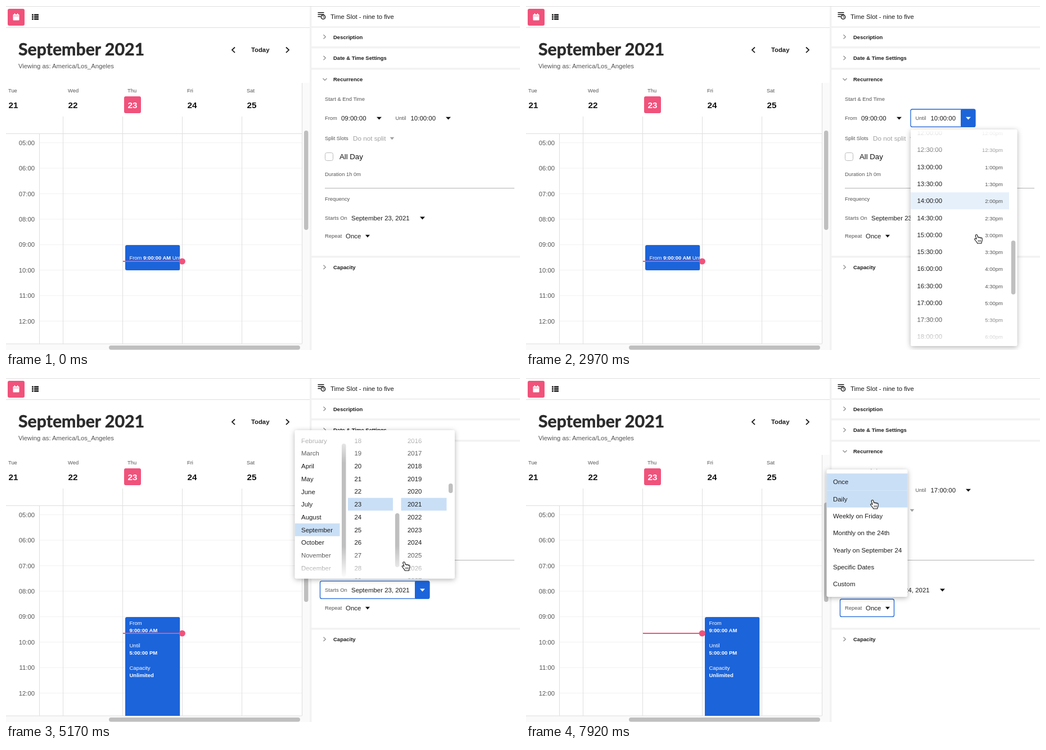
Recreate the animation shown at these times as an HTML page. Size 914 px wide and 613 px high, loop 8 s.

```html
<!DOCTYPE html>
<html lang="en">
<head>
<meta charset="utf-8">
<title>Time slot editor</title>
<style>
  html, body { margin: 0; width: 100%; height: 100%; overflow: hidden; background: #fff; }
  svg { display: block; }
  text { font-family: "Liberation Sans", Arial, sans-serif; white-space: pre; }
  .title { font-family: Lato, sans-serif; }
  .popup { filter: drop-shadow(0 2px 5px rgba(0, 0, 0, .3)); }
</style>
</head>
<body>
<svg width="914" height="613" viewBox="0 0 914 613">
  <defs>
    <linearGradient id="fadeTop" x2="0" y2="1">
      <stop stop-color="#fff"/><stop offset="1" stop-color="#fff" stop-opacity="0"/>
    </linearGradient>
    <linearGradient id="fadeBottom" x2="0" y2="1">
      <stop stop-color="#fff" stop-opacity="0"/><stop offset="1" stop-color="#fff"/>
    </linearGradient>
  </defs>
  <g id="base"></g>
  <g id="live"></g>
</svg>
<script>
const LOOP = 8000, STEP = 110;
const BLUE = '#1c64da', PINK = '#f0527b', INK = '#1c1c1c', GREY = '#555', PICKED = '#c9dff6', HOVER = '#e6f0fb';
const ROW = 30.27, DATE_ROW = 22.7, HOUR = 45.4, DAY = 106;

const range = n => [...Array(n).keys()];
const rect = (x, y, w, h, fill, r = 0, extra = '') =>
  `<rect x="${x}" y="${y}" width="${w}" height="${h}" rx="${r}" fill="${fill}" ${extra}/>`;
const path = (d, stroke, width = 1, fill = 'none') =>
  `<path d="${d}" stroke="${stroke}" stroke-width="${width}" fill="${fill}"/>`;
// y is the middle of the capital letters
const text = (x, y, str, size, fill = INK, extra = '') =>
  `<text x="${x}" y="${y + size * .36}" font-size="${size}" fill="${fill}" ${extra}>${str}</text>`;
const BOLD = 'font-weight="700"', END = 'text-anchor="end"', MIDDLE = 'text-anchor="middle"';
const label = (x, y, str) => text(x, y, str, 9.4, GREY);
const value = (x, y, str, fill) => text(x, y, str, 11.45, fill);
const caret = (x, y, fill = '#111', half = 4.5) => path(`M${x - half} ${y - 2.2}h${2 * half}l${-half} 4.8z`, 'none', 0, fill);
const thumb = (x, y, w, h) => rect(x, y, w, h, '#bfbfbf', 3.7);

function section(y, title, open) {
  const chevron = open ? `M563.5 ${y - 2}l3.5 3.5 3.5-3.5` : `M564.5 ${y - 4}l3.8 3.6-3.8 3.6`;
  return path(chevron, '#888', 1.2) + text(582, y, title, 9.5, INK, BOLD);
}

function drawBase() {
  let s = path('M0 .5H914M0 38.5H540M543 37.5H914', '#dedede');
  s += rect(3, 5, 30, 30, PINK, 3) + rect(12.5, 15, 11, 10.5, '#fff', 1)
    + path('M15.5 13v3M20.5 13v3', '#fff', 1.6) + path('M13.5 17.7h9', PINK, .8);
  s += range(3).map(i => rect(46, 14.5 + 3.7 * i, 2.8, 2.7, INK) + rect(50, 14.5 + 3.7 * i, 8, 2.7, INK)).join('');
  s += text(22, 77.5, 'September 2021', 30.3, '#2a2a2a', BOLD + ' class="title" stroke="#2a2a2a" stroke-width=".5"');
  s += text(22, 106.5, 'Viewing as: America/Los_Angeles', 11.3, GREY);
  s += path('M407 73.5l-5 4.8 5 4.8M498 73.5l5 4.8-5 4.8', INK, 1.8) + text(436, 78, 'Today', 11.3, INK, BOLD);

  // week grid
  s += rect(527, 137, 13, 465, '#fafafa') + rect(0, 602, 540, 11, '#fafafa');
  range(8).forEach(i => {
    const y = 243.7 + HOUR * i;
    s += path(`M59 ${y}H526`, '#f1f1f1') + text(51, y, `${i + 5}:00`.padStart(5, '0'), 11.3, GREY, END);
  });
  s += path('M101.5 197V602M207.5 197V602M313.5 197V602M419.5 197V602M59.5 228V602M526.5 137V602M0 227.5H526M0 602H526', '#dedede');
  ['Tue', 'Wed', 'Thu', 'Fri', 'Sat'].forEach((name, i) => {
    const today = i === 2, x = 4 + DAY * i;
    s += label(x, 151, name);
    if (today) s += rect(210, 161, 30, 30, PINK, 3);
    s += today ? text(225, 177, 23, 15.2, '#fff', BOLD + MIDDLE.padStart(20)) : text(x + .5, 177, 21 + i, 15.2, '#111', BOLD);
  });
  s += thumb(530, 222, 7.5, 177) + thumb(183, 605, 340, 7.5);

  // editor panel
  s += rect(540, 1, 3.5, 612, '#f2f2f2')
    + [72, 110, 445].map(y => rect(543, y, 371, 3.5, '#f2f2f2')).join('');
  s += path('M554.5 11.7h11M554.5 15.2h11M554.5 18.7h5', INK, 1.5)
    + `<circle cx="564" cy="19.7" r="3.6" fill="#fff" stroke="${INK}" stroke-width="1.5"/>` + path('M564 17.6v2.3h1.7', INK, 1);
  s += text(577, 18.7, 'Time Slot - nine to five', 11.4);
  s += section(55.3, 'Description') + section(93, 'Date &amp; Time Settings')
    + section(131, 'Recurrence', true) + section(465.8, 'Capacity');
  s += label(567, 166, 'Start &amp; End Time') + label(567, 200, 'From') + value(596, 199.5, '09:00:00') + caret(663.5, 200);
  s += label(567, 236, 'Split Slots') + text(617, 235.5, 'Do not split', 11.7, '#a0a0a0') + caret(686.5, 236, '#a0a0a0', 3.8);
  s += rect(567.5, 261.5, 14, 14, '#fff', 3, 'stroke="#bbb"') + text(593, 268, 'All Day', 13.2, '#111');
  s += path('M567 324.7H904', '#bdbdbd', 1.2) + label(567, 344, 'Frequency');
  return s;
}

function field(x, y, w, name, textX, content, caretX, active, button) {
  let s = '';
  if (active) {
    s += rect(x, y - 15.7, w, 31.4, '#fff', 3, `stroke="${BLUE}" stroke-width="1.3"`);
    if (button) s += rect(x + w - 26, y - 15.7, 26, 31.4, BLUE, 2);
  }
  return s + label(x + 8.6, y + .4, name) + value(textX, y, content)
    + caret(caretX, y + .3, active && button ? '#fff' : '#111', button ? 4.5 : 4);
}

function slotBlock(day, long) {
  const x = 212 + (day - 23) * DAY, tx = x + 7.5;
  const body = long
    ? [['From', '9:00:00 AM'], ['Until', '5:00:00 PM'], ['Capacity', 'Unlimited']].map(([name, val], i) =>
        text(tx, 436.8 + 39.8 * i, name, 9.5, '#fff') + text(tx, 450 + 39.8 * i, val, 9.5, '#fff', BOLD)).join('')
    : text(tx, 449, `From <tspan ${BOLD}>9:00:00 AM</tspan> Until`, 9.4, '#fff');
  const h = long ? 176 : 45;
  return `<svg x="${x}" y="426" width="97.5" height="${h}" viewBox="${x} 426 97.5 ${h}">`
    + rect(x, 426, 97.5, long ? 190 : 45, BLUE, 3) + body + '</svg>';
}

function popup(x, y, w, h, fade, content) {
  return rect(x, y, w, h, '#fff', 3, 'class="popup"')
    + `<svg x="${x}" y="${y}" width="${w}" height="${h}" viewBox="${x} ${y} ${w} ${h}">` + content
    + (fade ? rect(x, y, w, fade, 'url(#fadeTop)', 3) + rect(x, y + h - fade, w, fade, 'url(#fadeBottom)', 3) : '')
    + '</svg>';
}

function timeList(scroll, hovered) {
  const rows = range(48).map(i => {
    const y = 267 + (i - 20) * ROW - scroll;
    if (y < 200 || y > 625) return '';
    const hour = i >> 1, minute = i % 2 ? '30' : '00';
    const fill = i === 20 ? PICKED : i === hovered ? HOVER : 'none';
    return rect(684, y - ROW / 2, 175, ROW, fill)
      + value(695.5, y, `${String(hour).padStart(2, '0')}:${minute}:00`)
      + text(848, y + .7, `${hour % 12 || 12}:${minute}${hour < 12 ? 'am' : 'pm'}`, 9.5, GREY, END);
  }).join('');
  return popup(684, 220, 189.5, 386, 66, rows + thumb(862.8, 375 + scroll * .2654, 7.5, 96));
}

function datePicker(day, hovered) {
  const months = 'January February March April May June July August September October November December'.split(' ');
  const column = (x, w, items, picked, pickedY) => items.map((item, i) => {
    const y = pickedY + (i - items.indexOf(picked)) * DATE_ROW;
    const fill = item === picked ? PICKED : item === hovered ? HOVER : 'none';
    return rect(x, y - DATE_ROW / 2, w, DATE_ROW, fill) + value(x + 11.5, y, item);
  }).join('');
  return popup(513.5, 93, 284.5, 264.5, 58,
    column(513.5, 80, months, 'September', 270.5)
    + column(608, 80, range(30).map(i => i + 1), day, 225 + (day - 23) * DATE_ROW)
    + column(702.5, 81, range(16).map(i => 2014 + i), 2021, 225)
    + thumb(597, 117, 7.5, 237) + thumb(692, 241, 7.5, 96) + thumb(787, 188, 7.5, 17));
}

function repeatList(hovered) {
  const items = ['Once', 'Daily', 'Weekly on Friday', 'Monthly on the 24th', 'Yearly on September 24', 'Specific Dates', 'Custom'];
  return popup(534.5, 163, 144, 227, 0, items.map((item, i) => {
    const y = 185.3 + ROW * i;
    return rect(534, y - ROW / 2, 145, ROW, i === 0 || i === hovered ? PICKED : 'none') + value(546, y, item);
  }).join(''));
}

// [time, x, y] of the pointer tip
const pointerPath = [
  [880, 800, 640], [1320, 781, 198], [1540, 781, 198], [2090, 801, 407], [3080, 801, 407], [3410, 768, 524],
  [3740, 768, 524], [4070, 766, 484], [4290, 766, 484], [4730, 740, 373], [4950, 740, 373], [5500, 648, 243],
  [5720, 648, 243], [6050, 650, 263], [6160, 650, 263], [6820, 632, 408], [7040, 628, 405], [7480, 628, 405], [7920, 616, 217]
];
const ease = u => u * u * (3 - 2 * u);
const ramp = (t, a, b) => ease(Math.min(1, Math.max(0, (t - a) / (b - a))));

function pointerAt(t) {
  let [, x, y] = pointerPath[0];
  pointerPath.slice(1).forEach(([end, nx, ny], i) => {
    const u = ramp(t, pointerPath[i][0], end);
    x += (nx - x) * u;
    y += (ny - y) * u;
  });
  return [x, y];
}

function pointer(x, y, hand) {
  const shape = hand
    ? path('M0 .5C-1.6.5-2 1.8-1.6 3L.2 8.6C-1 7.4-2.6 7-3.4 8-3.8 9-2.6 9.6-1.6 11L1 14.4 1.6 16H8.8L9.2 14C10.4 12 10.6 10 10.2 7.4 10 5.8 8.2 5.6 7.8 6.6 7.6 5.2 5.6 4.8 5 6 4.6 4.6 3.2 4.4 2.6 5.2L1.6 1.6C1.2.8.8.5 0 .5Z', '#111', 1.1, '#fff')
      + path('M3.2 10v3.4M5.3 10v3.4M7.4 10v3.4', '#111', .8)
    : path('M0 0V12.5L2.9 9.8 4.8 14 6.9 13.1 5.1 9H9Z', '#fff', 1, '#000');
  return `<g transform="translate(${x} ${y})">${shape}</g>`;
}

function drawLive(t) {
  const [px, py] = pointerAt(t);
  const during = (a, b) => t >= a && t < b;
  const over = (x, y, w) => px > x && px < x + w && Math.abs(py - y) < 16;
  const long = t >= 3740, day = t >= 5610 ? 24 : 23;
  const timesOpen = during(1540, 3740), dateOpen = during(4840, 6160), repeatOpen = t >= 7480;
  const overUntil = timesOpen || over(684, 199.7, 115);
  const overDate = dateOpen || (!repeatOpen && over(558, 377.5, 195));
  const overRepeat = repeatOpen || (!dateOpen && over(558, 409.7, 97));

  let s = slotBlock(day, long) + path('M208 455H313', PINK, 1.8) + `<circle cx="313.3" cy="455" r="5.6" fill="${PINK}"/>`;
  s += label(567, 300, `Duration ${long ? 8 : 1}h 0m`);
  s += field(684, 199.7, 115, 'Until', 719.5, long ? '17:00:00' : '10:00:00', 786.5, overUntil, true);
  s += field(558.5, 377.5, 194.5, 'Starts On', 614, `September ${day}, 2021`, 740.5, overDate, true);
  s += field(558.5, 409.7, 96, 'Repeat', 604, 'Once', 643, overRepeat, false);

  if (timesOpen) {
    const scroll = 162 * ramp(t, 2310, 2970);
    const hovered = t < 2530 ? -1 : t < 3080 ? 28 : Math.round((py + 5 - 267 + scroll) / ROW) + 20;
    s += timeList(scroll, hovered);
  }
  if (dateOpen) {
    const hovering = px < 688 && py < 350 && t < 5610;
    s += datePicker(day, hovering ? 23 + Math.round((py + 4 - 225) / DATE_ROW) : 0);
  }
  if (repeatOpen) s += repeatList(Math.round((py - 185.3) / ROW));

  const hand = overUntil || overDate || overRepeat;
  return t >= 880 ? s + pointer(px, py, hand) : s;
}

document.getElementById('base').innerHTML = drawBase();
const live = document.getElementById('live');
const start = performance.now();
let shown = -1;
function tick() {
  const t = Math.floor((performance.now() - start) % LOOP / STEP) * STEP;
  if (t !== shown) live.innerHTML = drawLive(shown = t);
  requestAnimationFrame(tick);
}
tick();
</script>
</body>
</html>
```
